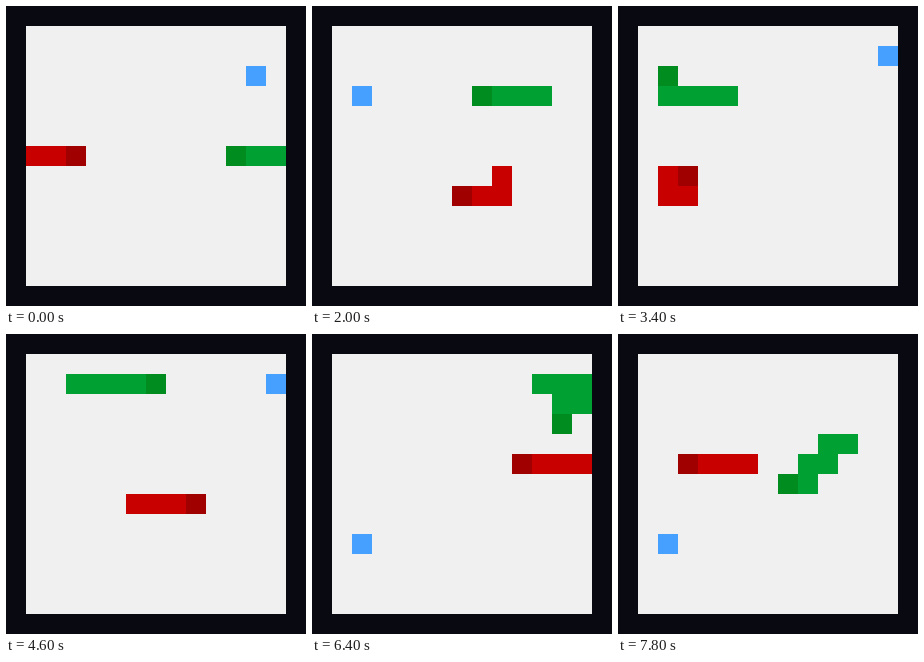
These frames come from a looping animation (300x300 px, 8000 ms). An HTML page with a canvas:

```html
<!DOCTYPE html>
<html lang="en">
<head>
<meta charset="utf-8">
<title>Two snakes</title>
<style>
html, body { margin: 0; width: 100%; height: 100%; overflow: hidden; background: #090912; }
canvas { display: block; width: 100%; height: 100%; image-rendering: pixelated; }
</style>
</head>
<body>
<canvas id="stage" width="300" height="300"></canvas>
<script>
const CELL = 20, STEP = 200, STEPS = 40, START_LENGTH = 3;
const MOVES = { L: [-1, 0], R: [1, 0], U: [0, -1], D: [0, 1] };
const ctx = document.getElementById('stage').getContext('2d');

// Expands a route such as "R3 U" into the list of visited cells.
function trace(x, y, route) {
  const cells = [[x, y]];
  for (const [, dir, count] of route.matchAll(/([LRUD])(\d*)/g)) {
    for (let i = 0; i < (count || 1); i++) {
      x += MOVES[dir][0];
      y += MOVES[dir][1];
      cells.push([x, y]);
    }
  }
  return cells;
}

// The first two moves of each route lay out the starting body.
const snakes = [
  { body: '#c80000', head: '#a00000', meals: [8],
    path: trace(1, 7, 'R2 R6 D2 L7 U R11 U2 L10') },
  { body: '#00a032', head: '#008c1e', meals: [5, 16, 29],
    path: trace(13, 7, 'L2 U R U3 L D L9 U R U R10' + ' D L'.repeat(5)) }
];

const foods = [
  { from: 0, cell: [12, 3] },
  { from: 5, cell: [9, 9] },
  { from: 8, cell: [2, 4] },
  { from: 16, cell: [13, 2] },
  { from: 29, cell: [2, 10] }
];

function fillCell([x, y], color) {
  ctx.fillStyle = color;
  ctx.fillRect(x * CELL, y * CELL, CELL, CELL);
}

function draw(step) {
  ctx.fillStyle = '#090912';
  ctx.fillRect(0, 0, 300, 300);
  ctx.fillStyle = '#f0f0f0';
  ctx.fillRect(CELL, CELL, 260, 260);

  fillCell(foods.filter(food => food.from <= step).pop().cell, '#46a0ff');

  for (const { path, meals, body, head } of snakes) {
    const length = START_LENGTH + meals.filter(meal => meal <= step).length;
    const end = step + START_LENGTH;
    path.slice(end - length, end - 1).forEach(cell => fillCell(cell, body));
    fillCell(path[end - 1], head);
  }
}

const start = performance.now();
function tick() {
  const elapsed = performance.now() - start;
  draw(Math.floor(elapsed / STEP) % STEPS);
  requestAnimationFrame(tick);
}
tick();
</script>
</body>
</html>
```
